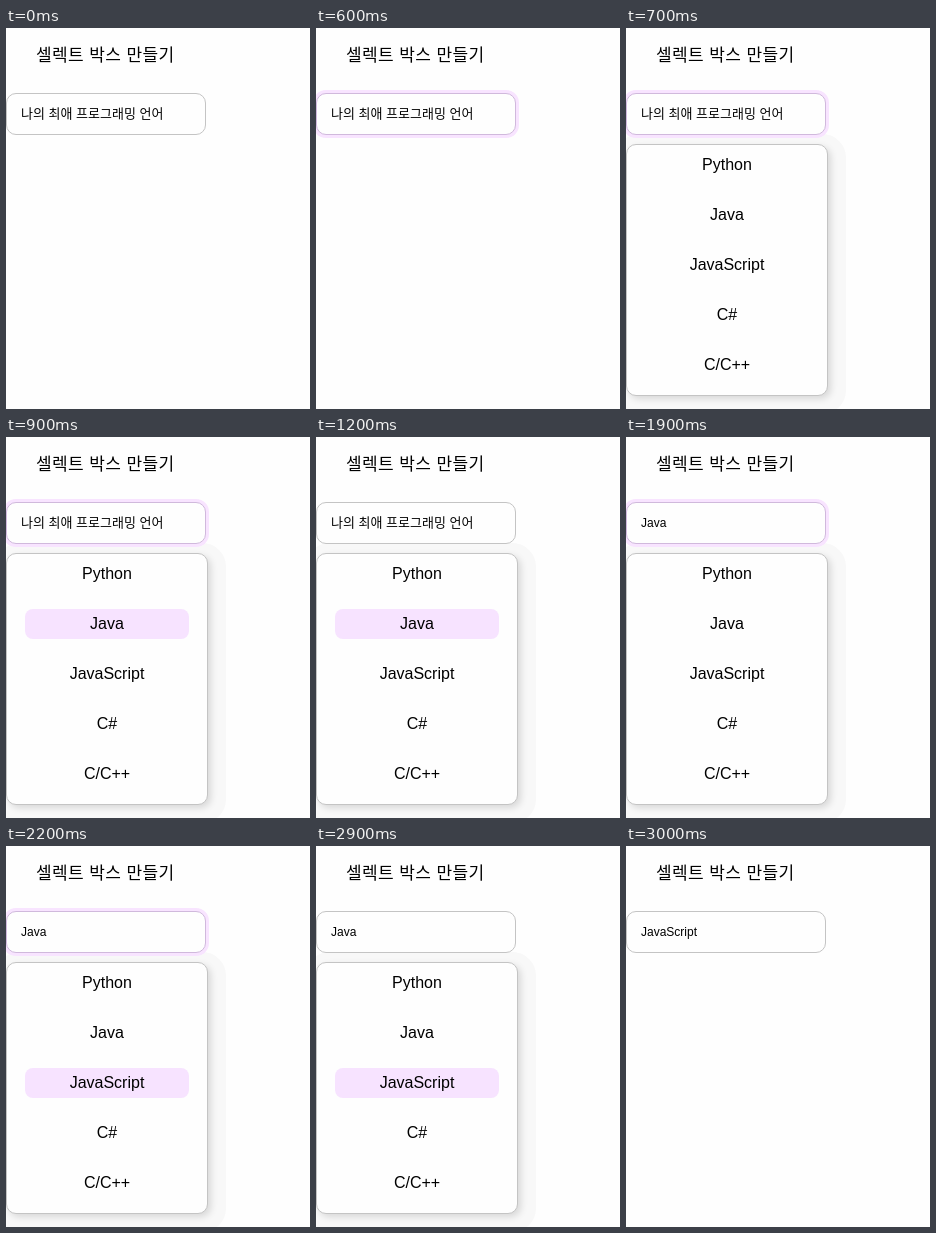
Write an HTML page that moves like this. It is 304x381 px and loops after 3900 ms.

```html
<!DOCTYPE html>
<html lang="ko">
<head>
<meta charset="utf-8">
<title>셀렉트 박스 만들기</title>
<style>
  html, body {
    margin: 0;
    width: 100%;
    height: 100%;
    overflow: hidden;
    background: #fefefe;
  }
  body {
    position: relative;
    color: #000;
    font-family: "Liberation Sans", Arial, sans-serif;
  }
  h1, .label, .list, .option {
    position: absolute;
    box-sizing: border-box;
    margin: 0;
    white-space: nowrap;
  }
  h1, .label.ko {
    font-family: "Noto Sans CJK KR", "Noto Sans CJK", sans-serif;
    font-weight: 300;
  }
  h1 {
    left: 30px;
    top: 11px;
    font-size: 17px;
    line-height: 30px;
    letter-spacing: .4px;
  }
  .label {
    left: 0;
    top: 65px;
    z-index: 1;
    width: 200px;
    height: 42px;
    padding-left: 14px;
    border: 1px solid #c4c4c4;
    border-radius: 10px;
    background: #fefefe;
    font-size: 12px;
    line-height: 40px;
  }
  .label.ko {
    font-size: 13px;
    line-height: 37px;
  }
  .label.focus {
    border-color: #d0b9dc;
    box-shadow: 0 0 0 3px #f8e4ff;
  }
  .list {
    left: 0;
    top: 116px;
    width: 202px;
    height: 252px;
    border: 1px solid #c4c4c4;
    border-radius: 10px;
    background: #fefefe;
    box-shadow: 3px 3px 7px rgba(0, 0, 0, .13), 4px 4px 0 14px #f8f8f8;
  }
  .option {
    left: 18px;
    width: 164px;
    height: 30px;
    border-radius: 8px;
    font-size: 16px;
    line-height: 29px;
    text-align: center;
  }
  .option.hover { background: #f7e3ff; }
</style>
</head>
<body>
<h1>셀렉트 박스 만들기</h1>
<div class="label ko"></div>
<div class="list"></div>
<script>
const LOOP = 3900;
const PROMPT = '나의 최애 프로그래밍 언어';
const names = ['Python', 'Java', 'JavaScript', 'C#', 'C/C++'];

// start ms, label text, label focused, list open, hovered option
const steps = [
  [0, PROMPT, false, false, ''],
  [600, PROMPT, true, false, ''],
  [700, PROMPT, true, true, ''],
  [900, PROMPT, true, true, 'Java'],
  [1200, PROMPT, false, true, 'Java'],
  [1400, 'Java', false, false, ''],
  [1900, 'Java', true, true, ''],
  [2200, 'Java', true, true, 'JavaScript'],
  [2900, 'Java', false, true, 'JavaScript'],
  [3000, 'JavaScript', false, false, '']
];

const label = document.querySelector('.label');
const list = document.querySelector('.list');
const options = names.map((name, i) => {
  const el = document.createElement('div');
  el.className = 'option';
  el.textContent = name;
  el.style.top = 5 + i * 50 + 'px';
  list.append(el);
  return el;
});

let current = null;

function show(step) {
  if (step === current) return;
  current = step;
  const [, text, focus, open, hover] = step;
  label.textContent = text;
  label.classList.toggle('ko', text === PROMPT);
  label.classList.toggle('focus', focus);
  list.style.visibility = open ? 'visible' : 'hidden';
  options.forEach((el, i) => el.classList.toggle('hover', names[i] === hover));
}

const start = performance.now();

function tick() {
  const t = (performance.now() - start) % LOOP;
  show(steps.findLast(step => step[0] <= t));
  requestAnimationFrame(tick);
}
tick();
</script>
</body>
</html>
```
